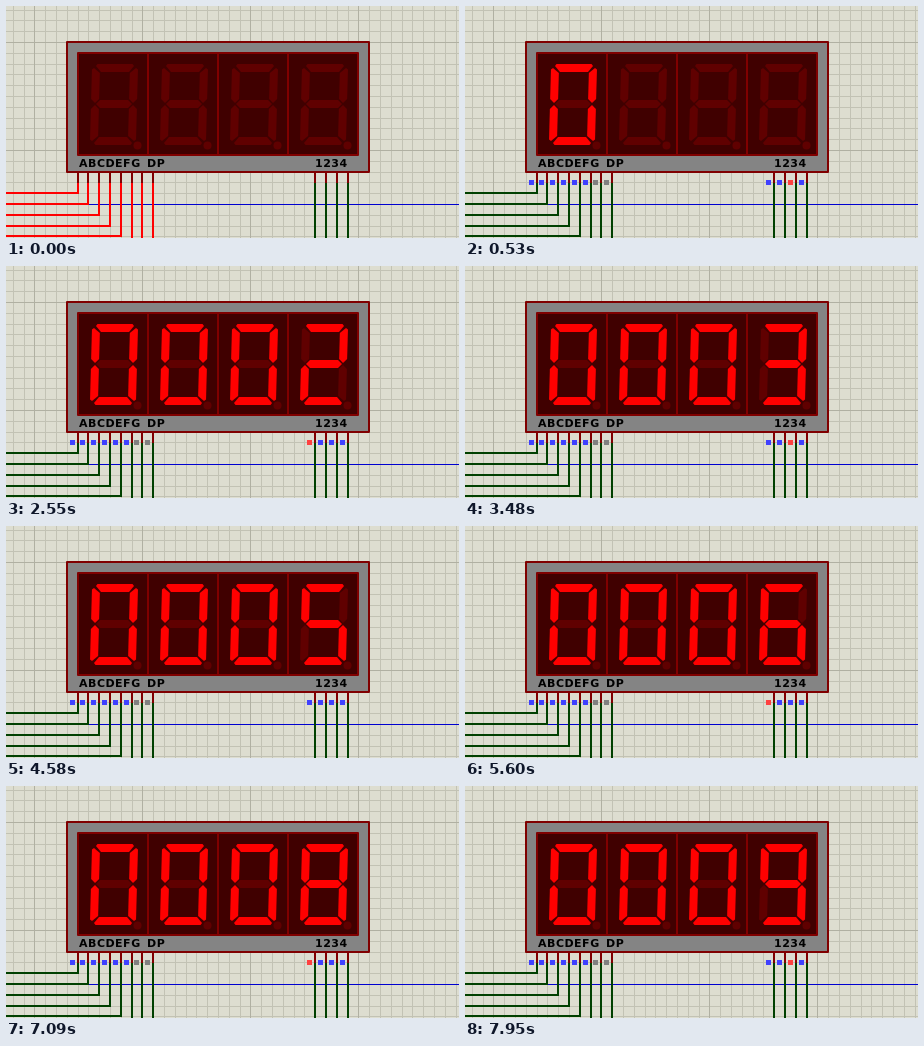
An HTML page with a canvas that plays this animation: 453x232 px, repeating every 8 s.

```html
<!DOCTYPE html>
<html lang="en">
<head>
<meta charset="utf-8">
<title>Multiplexed counter</title>
<style>
  html, body { margin: 0; width: 100%; height: 100%; overflow: hidden; background: #ddddd0; }
  canvas { display: block; }
</style>
</head>
<body>
<canvas id="stage" width="453" height="232"></canvas>
<script>
const ctx = document.getElementById('stage').getContext('2d');
const LOOP = 8000, POWER_ON = 460, COUNT_PERIOD = 813;
const SCAN_START = 270, SCAN_PERIOD = 750, SCAN_SLOT = 90;
const PITCH = 10.8, RIGHT_PINS = 22 * PITCH, CELL = 70;
const DARK_RED = '#800000', LIT = '#ff0000', UNLIT = '#600000';
const GREEN = '#004000', BLUE = '#4040ff', RED = '#ff4040', GRAY = '#808080';

// Lit segments of the digits 0 to 9
const GLYPHS = 'abcdef bc abdeg abcdg bcfg acdfg acdefg abc abcdefg abcdfg'.split(' ');

// Clockwise joints of a slightly slanted eight; segments a to f run round it, g crosses it
const MIDDLE = 98;
const JOINTS = [[18, 62], [56, 62], [55, MIDDLE], [54, 135], [16, 135], [17, MIDDLE]];
const SEGMENTS = [...'abcdefg'].map((name, i) => ({
  name,
  path: name === 'g' ? segmentPath(JOINTS[5], JOINTS[2]) : segmentPath(JOINTS[i], JOINTS[(i + 1) % 6])
}));

// A bar with blunt outer corners, or pointed ends where it meets the middle
function segmentPath(from, to) {
  const length = Math.hypot(to[0] - from[0], to[1] - from[1]);
  const ux = (to[0] - from[0]) / length, uy = (to[1] - from[1]) / length;
  const cap = joint => joint[1] === MIDDLE ? [[5, -4], [1, 0], [5, 4]] : [[5, -4], [0, 2], [1.5, 4]];
  const outline = [
    ...cap(from),
    ...cap(to).reverse().map(([inset, out]) => [length - inset, out])
  ];
  const path = new Path2D();
  for (const [along, out] of outline) {
    path.lineTo(from[0] + ux * along + uy * out, from[1] + uy * along - ux * out);
  }
  return path;
}

function stateAt(time) {
  const elapsed = time - POWER_ON;
  const slot = Math.floor((time - SCAN_START) % SCAN_PERIOD / SCAN_SLOT) + 1;
  return {
    powered: elapsed >= 0,
    digit: Math.floor(elapsed / COUNT_PERIOD),
    litCells: Math.floor(elapsed / 80) + 1,
    selected: slot <= 4 ? slot : 0
  };
}

function box(color, x, y, w, h) {
  ctx.fillStyle = color;
  ctx.fillRect(Math.floor(x), Math.floor(y), w, h);
}

function drawGrid() {
  box('#ddddd0', 0, 0, 453, 232);
  for (const major of [false, true]) {
    const color = major ? '#b0b0a2' : '#c2c2b4';
    for (let k = 0; k < 42; k++) {
      if ((k % 10 === 2) === major) box(color, 7.2 + k * PITCH, 0, 1, 232);
      if ((k % 10 === 3) === major) box(color, 0, 4 + k * PITCH, 453, 1);
    }
  }
}

function drawWires(powered) {
  box('#0000d0', 0, 198, 453, 1);
  const color = powered ? GREEN : LIT;
  for (let i = 0; i < 8; i++) {
    const x = Math.floor(71.01 + i * PITCH), y = Math.floor(186.61 + i * PITCH);
    const bends = i < 5;
    box(color, x, 166, 2, bends ? y - 164 : 66);
    if (bends) box(color, 0, y, x + 2, 2);
    box(DARK_RED, x, 166, 2, 11);
  }
  for (let i = 0; i < 4; i++) {
    const x = 71.01 + RIGHT_PINS + i * PITCH;
    box(GREEN, x, 166, 2, 66);
    box(DARK_RED, x, 166, 2, 11);
  }
}

function drawDigit(cell, lit) {
  ctx.save();
  ctx.translate(72 + cell * CELL, 0);
  for (const { name, path } of SEGMENTS) {
    ctx.fillStyle = lit.includes(name) ? LIT : UNLIT;
    ctx.fill(path);
  }
  ctx.fillStyle = UNLIT;
  ctx.beginPath();
  ctx.arc(59.5, 139.5, 4, 0, 2 * Math.PI);
  ctx.fill();
  ctx.restore();
}

function panel(color, x, y, w, h) {
  box(color, x, y, w, h);
  ctx.strokeStyle = DARK_RED;
  ctx.lineWidth = 2;
  ctx.lineJoin = 'round';
  ctx.strokeRect(x, y, w, h);
}

function drawDisplay({ digit, litCells }) {
  panel('#848484', 61, 36, 302, 130);
  panel('#400000', 72, 47, 280, 102);
  for (let i = 0; i < 4; i++) {
    if (i > 0) box(DARK_RED, 71 + i * CELL, 47, 2, 102);
    drawDigit(i, i < litCells ? GLYPHS[i === 3 ? digit : 0] : '');
  }
  ctx.fillStyle = '#000';
  ctx.font = 'bold 11px "DejaVu Sans", sans-serif';
  ctx.letterSpacing = '0.5px';
  ctx.fillText('ABCDEFG', 73, 161);
  ctx.fillText('DP', 141, 161);
  ctx.fillText('1234', 309, 161);
}

function drawPinStates({ powered, selected, digit }) {
  if (!powered) return;
  const driven = GLYPHS[selected === 4 ? digit : 0];
  const square = (color, x) => box(color, x, 174, 5, 5);
  [...'abcdefg.'].forEach((name, i) =>
    square(driven.includes(name) ? BLUE : GRAY, 64.01 + i * PITCH));
  for (let i = 0; i < 4; i++) {
    square(selected === i + 1 ? RED : BLUE, 64.01 + RIGHT_PINS + i * PITCH);
  }
}

const startTime = performance.now();
function render() {
  const state = stateAt((performance.now() - startTime) % LOOP);
  drawGrid();
  drawWires(state.powered);
  drawDisplay(state);
  drawPinStates(state);
  requestAnimationFrame(render);
}
render();
</script>
</body>
</html>
```
